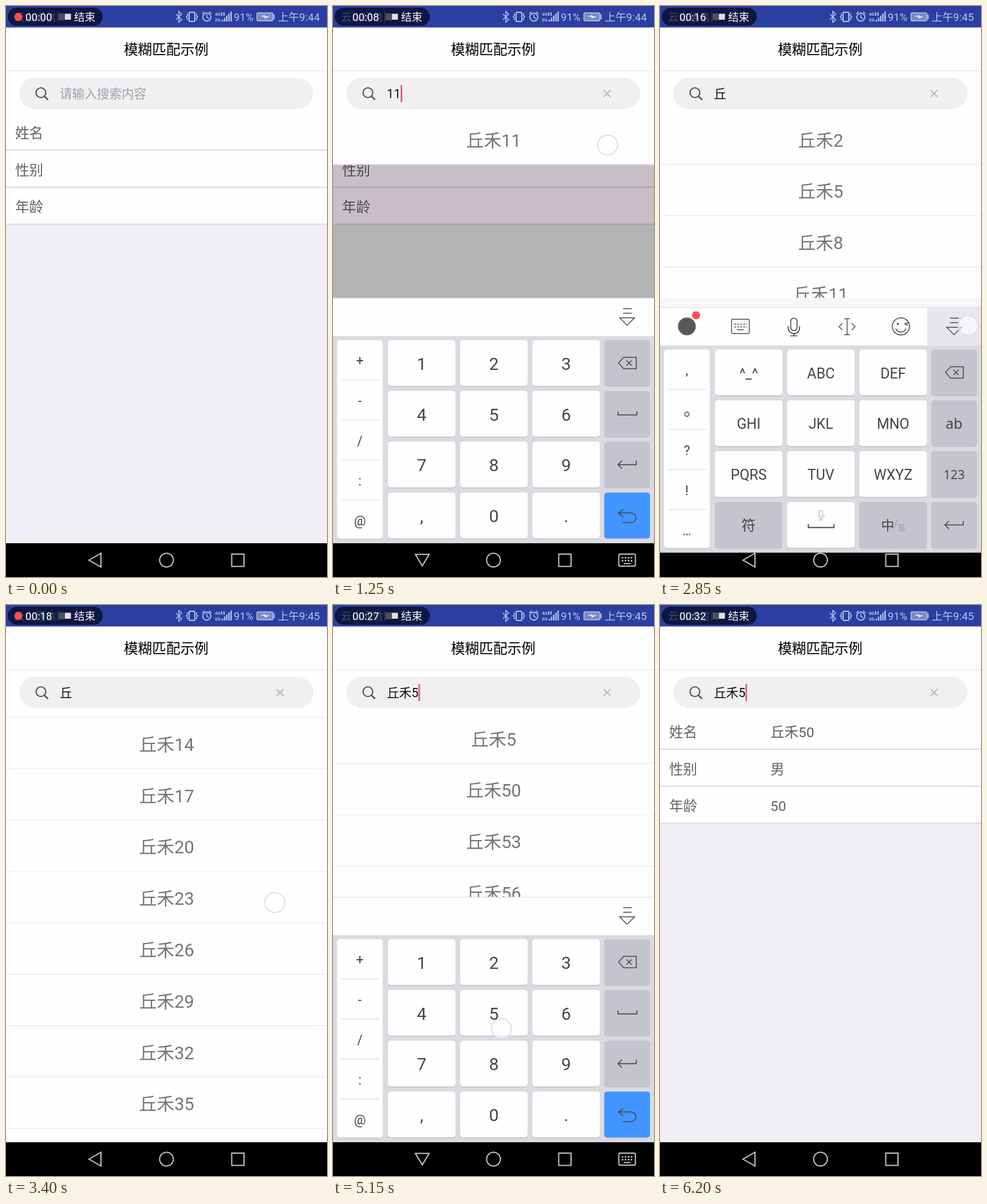
An HTML page for the animation above (6.25 s loop, 561 by 998 pixels).

```html
<!DOCTYPE html>
<html lang="zh">
<head>
<meta charset="utf-8">
<style>
html, body { margin: 0; width: 100%; height: 100%; overflow: hidden; background: #000; }
svg { display: block; width: 100%; height: 100%; font-family: Roboto, "Noto Sans CJK SC", "Noto Sans CJK", sans-serif; }
.latin { font-family: "Noto Sans", "Open Sans", "Noto Sans CJK SC", sans-serif; }
</style>
</head>
<body>
<svg id="stage" viewBox="0 0 561 998"></svg>
<script>
const LOOP = 6250, STEP = 50;
const INK = '#454549', PALE = '#bcc5ea', DARK_KEY = '#c4c4cd', NAV = '#c9c9c9';
const KB_TOP = 510, NAV_TOP = 939, LIST_TOP = 187, ROW = 89.8;

// ---- drawing helpers
const rect = (x, y, w, h, fill, r = 0, more = '') =>
  `<rect x="${x}" y="${y}" width="${w}" height="${h}" rx="${r}" fill="${fill}" ${more}/>`;
const line = (d, color = INK, w = 2, fill = 'none') =>
  `<path d="${d}" fill="${fill}" stroke="${color}" stroke-width="${w}"/>`;
const disc = (x, y, r, fill, more = '') =>
  `<circle cx="${x}" cy="${y}" r="${r}" fill="${fill}" ${more}/>`;
const ring = (x, y, r, color = INK, w = 2) =>
  disc(x, y, r, 'none', `stroke="${color}" stroke-width="${w}"`);
const text = (x, cy, s, size, fill = INK, anchor = 'middle', more = '') =>
  `<text x="${x}" y="${cy + size * .36}" font-size="${size}" fill="${fill}" text-anchor="${anchor}" ${more}>${s}</text>`;
const left = (x, cy, s, size, fill, more) => text(x, cy, s, size, fill, 'start', more);
const move = (x, y, s, k = 1) => `<g transform="translate(${x} ${y}) scale(${k})">${s}</g>`;
const mix = (pts, t) => {
  if (t <= pts[0][0]) return pts[0][1];
  for (let i = 1; i < pts.length; i++) {
    const [a, u] = pts[i - 1], [b, v] = pts[i];
    if (t <= b) return u + (v - u) * (t - a) / (b - a);
  }
  return pts[pts.length - 1][1];
};

// ---- icons, centred on 0,0
const latin = 'class="latin"';
const erase = line('M-15 0l9-10h22v20h-22zM-1-4.500l9 9m0-9l-9 9', INK, 1.6);
const enter = line('M16-7v7H-16m7-7l-7 7 7 7', INK, 1.6);
const shift = line('M0-12l14 13h-7v11h-14v-11h-7z', INK, 1.6);
const undo = line('M-7-12l-8 6 8 7M-15-6h22a8.5 8.5 0 0 1 0 17h-15', INK, 1.6);
const mic = color => rect(-5.5, -15, 11, 22, 'none', 5.5, `stroke="${color}" stroke-width="1.6"`) +
  line('M-10-1v3a10 10 0 0 0 20 0v-3M0 12v4M-6 16h12', color, 1.6);
const keypad = (w, h, color, weight) => rect(-w / 2, -h / 2, w, h, 'none', 2, `stroke="${color}" stroke-width="${weight}"`) +
  `<path d="M${-w / 2 + 5}-4h${w - 9}M${-w / 2 + 5} 1h${w - 9}" stroke="${color}" stroke-width="${weight + .3}" stroke-dasharray="3 2.200"/>` +
  line('M-6 6h12', color, weight);
const collapse = line('M507 529h15M507 537h15M501 545h26l-13 13z', INK, 1.5);

// ---- keyboards
const key = (x, y, w, h, dark) => rect(x, y + 1.5, w, h, '#bfc0c8', 5) + rect(x, y, w, h, dark ? DARK_KEY : '#fefefe', 5);
const space = (cx, y) => move(cx, y - 18, mic('#98989d'), .55) + line(`M${cx - 22} ${y - 2}v6h45v-6`, INK, 1.8);
const tools = disc(47, 543.5, 15.5, '#58585c') + disc(63, 524, 7, '#fd4c55') +
  move(140.5, 543.5, keypad(31, 25, INK, 1.4)) + move(234, 544, mic(INK)) +
  line('M327 530v28M322 530h10M322 558h10M319 538l-6 6 6 6M335 538l6 6-6 6', INK, 1.4) +
  ring(421, 543.5, 15, INK, 1.5) +
  line('M412 547a9.500 9.500 0 0 0 18 0M434 537l-6 2 5 3', INK, 1.5) + disc(415.5, 539, 1.8, INK) + collapse;

const gridY = [584, 672.7, 761.6, 850.5];
function grid(side, labels, size, corner) {
  let s = key(7, 584, 80, 347);
  side.forEach((c, i) => {
    const y = 620 + i * 70;
    s += c === '。' ? ring(47, y + 7, 3.7, INK, 1.5) : text(47, y, c, 23);
    if (i) s += rect(14, y - 37, 67, 1, '#d8d8dc');
  });
  labels.forEach((c, i) => {
    const x = 96 + i % 3 * 126.2, y = gridY[i / 3 | 0];
    const dark = c === '符' || c === 'lang';
    s += key(x, y, 118, 80, dark);
    if (c === 'space') s += space(x + 59, 891);
    else if (c === 'lang') s += text(398, 891, '中', 23) + line('M408 900l6-18', '#98989d', 1) + text(422, 895, '英', 14, '#98989d');
    else s += text(x + 59, y + 41, c, size);
  });
  gridY.forEach((y, i) => {
    s += key(474, y, 80, 80, true);
    s += corner[i](514, y + 40);
  });
  return s;
}
const icon = g => (x, y) => move(x, y, g);
const word = s => (x, y) => text(x, y + 1, s, s === '123' ? 21.5 : 25, INK, 'middle', latin);

function qwerty() {
  let s = '';
  const row = (chars, x0, y) => [...chars].forEach((c, i) => {
    const x = x0 + i * 55.1;
    s += key(x, y, 46, 71) + text(x + 23, y + 38, c, 26.5, INK, 'middle', latin);
  });
  row('qwertyuiop', 9.5, 591);
  row('asdfghjkl', 37.5, 680);
  row('zxcvbnm', 92, 768.5);
  row(',', 165.5, 857);
  row('.', 349, 857);
  for (const [x, y] of [[9, 768.5], [481, 768.5], [9, 857], [87, 857], [403.5, 857], [481, 857]]) s += key(x, y, 70, 72, true);
  s += key(221, 857, 119, 72) + space(280.5, 893);
  s += move(44, 805.5, shift) + move(516, 805, erase) + move(516, 894, enter);
  s += text(44, 894, '123', 21.5, INK, 'middle', latin) + text(122, 894, '符', 25);
  return s + text(423, 897, '中', 13, '#98989d') + line('M430 905l7-19', '#98989d', 1) + text(449, 894, '英', 23.5);
}

const boards = {
  qwerty: tools + qwerty(),
  pinyin: tools + grid([',', '。', '?', '!', '…'],
    ['^_^', 'ABC', 'DEF', 'GHI', 'JKL', 'MNO', 'PQRS', 'TUV', 'WXYZ', '符', 'space', 'lang'], 25,
    [icon(erase), word('ab'), word('123'), icon(enter)]),
  digits: collapse + grid(['+', '-', '/', ':', '@'], [1, 2, 3, 4, 5, 6, 7, 8, 9, ',', 0, '.'], 30,
    [icon(erase), icon(line('M-16-4v6h33v-6', INK, 1.8)), icon(enter),
     (x, y) => rect(474, 850.5, 80, 80, '#4294ff', 5) + move(x, y + 1.5, undo)])
};

// ---- story
const people = Array.from({ length: 100 }, (_, i) => ['贺木', '季田', '丘禾'][i % 3] + i);
const story = [
  [0, { view: 'form', up: false, board: 'qwerty', query: '', cursor: false, handle: false, person: null }],
  [350, { view: 'list', up: true, cursor: true }],
  [800, { board: 'digits' }],
  [1000, { query: '1' }],
  [1200, { query: '11' }],
  [1300, { view: 'form', person: 11 }],
  [1500, { view: 'list', query: '' }],
  [1700, { board: 'qwerty' }],
  [1900, { board: 'pinyin' }],
  [2650, { query: '丘' }],
  [2800, { up: false, cursor: false }],
  [3900, { up: true, cursor: true, handle: true }],
  [4500, { query: '丘禾', handle: false }],
  [4850, { board: 'digits' }],
  [5100, { query: '丘禾5' }],
  [5700, { view: 'form', person: 50 }],
  [6000, { up: false }]
];
// start, x, y, drag distance
const touches = [
  [300, 260, 155], [750, 44, 893], [950, 155, 630], [1100, 160, 628], [1200, 480, 243], [1450, 480, 155],
  [1700, 525, 885], [1850, 438, 893], [2100, 155, 822], [2250, 155, 733], [2400, 281, 822],
  [2800, 538.5, 558.5], [3200, 470, 800, -350], [3550, 480, 790, -420], [3850, 200, 155],
  [4150, 155, 733], [4300, 408, 644], [4800, 514, 806], [5100, 294.5, 740.5], [5650, 380, 324], [5950, 520, 545]
];
const scroll = [[3200, 0], [3400, 350], [3550, 480], [3750, 950], [3900, 1097.5]];
const seconds = [[0, .2], [1250, 8.7], [1800, 11.2], [2850, 16.7], [4000, 20.2], [5150, 27.6], [6200, 32.7], [6250, 32.9]];

function stateAt(t) {
  const s = {};
  let since = 0, turned = -LOOP;
  for (const [at, patch] of story) {
    if (at > t) break;
    if (at && 'up' in patch) turned = at;
    Object.assign(s, patch);
    since = at;
  }
  const d = t - turned;
  const p = Math.min(1, d / 135);
  s.drop = s.up ? 43 * (1 - p) ** 2 : .33 * d;
  s.alpha = s.up ? Math.min(1, 2 * p) : Math.max(0, Math.min(1, (150 - d) / 100));
  s.blink = s.cursor && (s.handle || (t - since) % 200 < 100);
  return s;
}

// ---- screen parts
const statusIcons = line('M297 14l10 10-5 4.500V9.500l5 4.500-10 10', PALE, 1.5) +
  rect(320, 11, 10, 16, 'none', 1.5, `stroke="${PALE}" stroke-width="2"`) +
  line('M317 13v4l-2 2 2 2v4M333 13v4l2 2-2 2v4', PALE, 1.6) +
  ring(351, 19.5, 7, PALE, 1.8) + line('M351 15v5l4 2M343 14l4-4M359 14l-4-4', PALE, 1.6) +
  text(370, 14.5, '4G', 8, PALE, 'middle', 'font-weight="700"') + text(370, 24, '2G', 8, PALE, 'middle', 'font-weight="700"') +
  [0, 1, 2, 3, 4].map(i => rect(377 + i * 3.8, 24 - i * 3.6, 2.4, 3 + i * 3.6, PALE)).join('') +
  line('M377 11v6M381 11v6', PALE, 2) +
  left(398, 19, '91%', 18.5, PALE) +
  rect(438.5, 12, 28, 14, '#7d89c4', 2, `stroke="${PALE}" stroke-width="1.4"`) + rect(467.5, 15, 2, 8, PALE) +
  '<path d="M444 18l9-2v2h8l-9 4v-3z" fill="#eef0fb"/>';

function status(t) {
  const sec = mix(seconds, t), two = String(Math.floor(sec)).padStart(2, '0');
  return rect(0, 0, 561, 37.5, '#2a3fa1') + rect(3, 3, 166, 31.5, '#0d1742', 15.7) +
    left(14, 19, '云山通信', 18.4, '#454d6d') + rect(90, 10, 1, 18, '#454d6d') +
    (sec % 1 < .5 ? disc(21.5, 19, 7, '#fd4c50') : '') +
    left(34, 19.5, '00:' + two, 18.7, '#fff') +
    rect(92, 13, 11, 12, '#4c5159') + rect(103, 13.5, 10.5, 10.5, '#dedee2', 1) +
    left(119, 19, '结束', 18.6, '#fff') + statusIcons +
    left(475, 19, t < 2300 ? '上午9:44' : '上午9:45', 18.7, PALE);
}

function form(s) {
  const dim = s.view === 'list';
  const values = s.person === null || dim ? [] : [people[s.person], '男', s.person];
  let g = rect(0, 37, 561, 902, dim ? '#b3b3b3' : '#f1eff3') + rect(0, 113, 561, 269, dim ? '#c8bec8' : '#fefefe');
  ['姓名', '性别', '年龄'].forEach((label, i) => {
    const y = 222 + i * 64.7, ink = dim ? '#4d4950' : '#626267';
    g += left(16, y, label, 24.5, ink) + rect(0, y + 29, 561, 2, dim ? '#a7a4ab' : '#dad8e2');
    if (i in values) g += left(193, y, values[i], 24.5, ink);
  });
  return g;
}

function list(s, t) {
  const bottom = s.alpha ? KB_TOP : NAV_TOP;
  const found = people.filter(p => p.includes(s.query));
  const off = s.query === '丘' ? mix(scroll, t) : 0;
  let g = rect(0, 180, 561, Math.min(bottom, LIST_TOP + found.length * ROW - off) - 180, '#fefefe');
  found.forEach((name, i) => {
    const y = LIST_TOP + i * ROW - off;
    if (y < 90 || y > bottom) return;
    g += text(280.8, y + 47.5, name, 30.8, '#757579') + rect(0, y + ROW - .5, 561, 1.2, '#ececee');
  });
  return `<clipPath id="view"><rect y="180" width="561" height="${bottom - 180}"/></clipPath><g clip-path="url(#view)">${g}</g>` +
    (s.alpha ? rect(0, KB_TOP, 561, NAV_TOP - KB_TOP, '#f6f5f7') : '');
}

function header(s) {
  const wide = [...s.query].reduce((w, c) => w + (c > '9' ? 21.6 : 12.1), 0), x = 95.3 + wide;
  let g = rect(0, 37, 561, 150, '#fefefe') + text(280, 76, '模糊匹配示例', 24.7, '#000') +
    rect(0, 112.5, 561, 1.2, '#e6e6e8') + rect(23, 125.5, 514, 54.5, '#f1eff2', 27.2) +
    ring(61, 151.5, 8.5, '#555', 2.2) + line('M67.500 158l6 6', '#555', 2.6);
  g += s.query ? left(94, 153.5, s.query, 21.6, '#111') + line('M473 147l12 12m0-12l-12 12', '#b9b8bc', 2)
    : left(94, 153.5, '请输入搜索内容', 21.6, '#a09fa4');
  if (s.blink) g += rect(x - 1.3, 138, 2.8, 30, s.handle ? '#fb6085' : '#e15c80');
  return g;
}
const handle = '<path d="M116.500 168l11 11a15.500 15.500 0 1 1-22 0z" fill="#fb6085"/>';

function keyboard(s) {
  if (!s.alpha) return '';
  return `<g transform="translate(0 ${s.drop})" opacity="${s.alpha}">` +
    rect(0, KB_TOP, 561, 67, '#fefefe') + rect(0, KB_TOP, 561, 1.3, '#dedce4') +
    (s.up ? '' : rect(467, 511, 94, 66, '#e9e6eb')) +
    rect(0, 577, 561, NAV_TOP - 577, '#dadbe1') + boards[s.board] + '</g>';
}

function nav(s) {
  return line(s.up ? 'M144 958.500h24l-12 20z' : 'M145 968.500l21-12v24z', NAV, 2) +
    ring(280.5, 968.5, 12, NAV, 2) + line('M394.500 958h21.500v21.500h-21.500z', NAV, 2) +
    (s.up ? move(514, 968.5, keypad(29, 21, NAV, 2)) : '');
}

function touch(t) {
  return touches.map(([at, x, y, drag = 0]) => {
    const d = t - at, span = drag ? 250 : 150;
    if (d < 0 || d >= span) return '';
    const a = drag ? .9 : 1 - Math.max(0, d - 50) / 100;
    return disc(x, y + drag * d / span, 17.5, 'rgba(255,255,255,.6)', `stroke="#dcd8ee" stroke-width="2" opacity="${a}"`);
  }).join('');
}

const stage = document.getElementById('stage');
let shown = -1;
function draw(now) {
  const t = Math.floor(now % LOOP / STEP) * STEP;
  if (t === shown) return;
  shown = t;
  const s = stateAt(t);
  stage.innerHTML = form(s) + (s.view === 'list' ? list(s, t) : '') + header(s) + (s.handle ? handle : '') +
    status(t) + rect(0, NAV_TOP, 561, 59, '#000') + keyboard(s) + nav(s) + touch(t);
}
const start = performance.now();
(function tick() {
  draw(Math.max(0, performance.now() - start));
  requestAnimationFrame(tick);
})();
</script>
</body>
</html>
```
